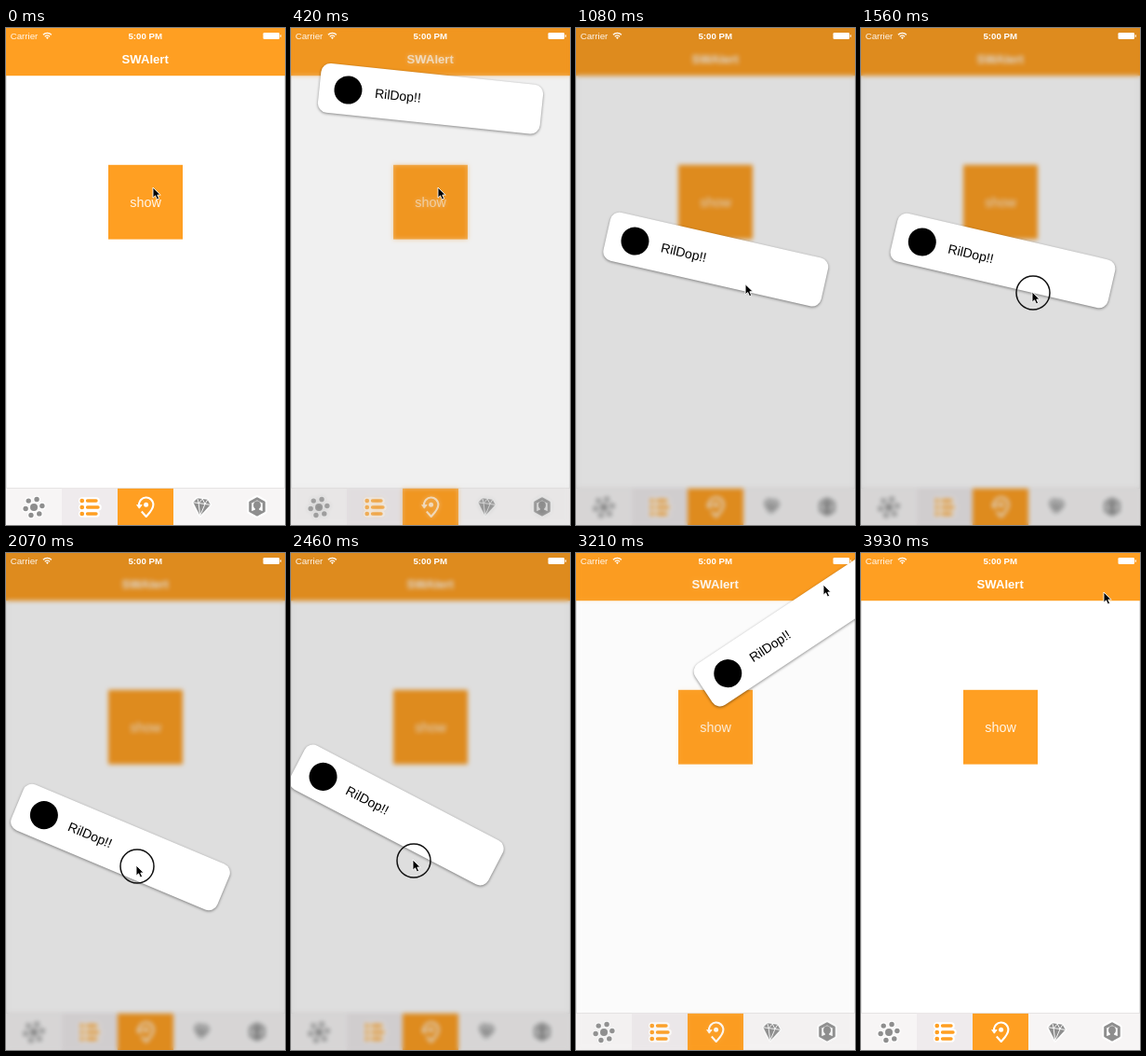
An HTML page that plays this animation: 300x533 px, repeating every 3960 ms.

```html
<!DOCTYPE html>
<html lang="en">
<head>
<meta charset="utf-8">
<title>Alert demo</title>
<style>
  html, body { margin: 0; width: 100%; height: 100%; overflow: hidden; background: #fff; }
  svg { display: block; width: 100vw; height: 100vh; font-family: "Liberation Sans", Arial, sans-serif; }
</style>
</head>
<body>
<svg viewBox="0 0 300 533" preserveAspectRatio="none">
  <defs>
    <filter id="blur" x="0" y="0" width="300" height="533" filterUnits="userSpaceOnUse" color-interpolation-filters="sRGB">
      <feGaussianBlur stdDeviation="2.7"/>
    </filter>
    <filter id="shadow" x="-300" y="-300" width="900" height="1100" filterUnits="userSpaceOnUse" color-interpolation-filters="sRGB">
      <feDropShadow dx="0" dy="1" stdDeviation="1.5" flood-color="#000" flood-opacity=".45"/>
    </filter>
  </defs>

  <g id="app">
    <rect width="300" height="533" fill="#fff"/>
    <path d="M.5 51V494M299.5 51V494" stroke="#000" stroke-opacity=".1"/>
    <rect width="300" height="51.2" fill="#ff9f22"/>
    <text x="149.7" y="38.3" font-size="13.1" font-weight="700" fill="#fff" text-anchor="middle">SWAlert</text>
    <rect x="110" y="146.8" width="80" height="79.8" fill="#ff9f22"/>
    <text x="150" y="191.7" font-size="14.4" fill="#fff" fill-opacity=".9" text-anchor="middle">show</text>

    <rect y="493.6" width="300" height="40" fill="#f7f5f5"/>
    <path d="M0 493.5H300" stroke="#e6e4e4"/>
    <rect x="60" y="493.6" width="60" height="40" fill="#efebed"/>
    <rect x="120" y="493.9" width="60" height="40" fill="#ff9f22"/>

    <g id="dots" fill="#8e8e8e" stroke="#fff" stroke-width="2.4" paint-order="stroke"></g>

    <g fill="none" stroke-linecap="round">
      <path d="M81.7 507H97M81.7 514H99M81.7 521H97" stroke="#fff" stroke-width="7.5"/>
      <path d="M81.7 507h.1M81.7 514h.1M81.7 521h.1" stroke="#ff9f22" stroke-width="4.6"/>
      <path d="M87.5 507H97M87.5 514H99M87.5 521H97" stroke="#ff9f22" stroke-width="3.4"/>
    </g>

    <g fill="none" stroke="#fff" stroke-width="2.1" stroke-linejoin="round">
      <path d="M143 511.5A7.7 7.7 0 0 1 158.4 511C158.4 516.5 153.2 521 150.7 524L145.8 518.5"/>
      <path d="M140.6 511.5H146.2L143.3 515.2Z" fill="#fff" stroke-width=".8"/>
      <circle cx="150.6" cy="511.3" r="2.5" fill="#fff" stroke="none"/>
    </g>

    <g transform="rotate(8 210 514)" stroke-linejoin="round">
      <path d="M204.5 505H215.5L219.3 510L210 523.3L200.7 510Z" fill="#8e8e8e" stroke="#fff" stroke-width="2.8" paint-order="stroke"/>
      <path d="M200.7 510H219.3M204.5 505L206.5 510L210 523L213.5 510L215.5 505M206.5 510L210 505L213.5 510" fill="none" stroke="#fff" stroke-width=".9"/>
    </g>

    <g stroke-linejoin="round">
      <path id="badge" d="M270 504.8L277.3 508.8V518L270 522L262.7 518V508.8Z" fill="#fff" stroke="#fff" stroke-width="7"/>
      <use href="#badge"/>
      <path d="M270 504.8L277.3 508.8V518L270 522L262.7 518V508.8Z" fill="#fff" stroke="#8e8e8e" stroke-width="3"/>
      <ellipse cx="270" cy="511.8" rx="4" ry="4.6" fill="#8e8e8e"/>
      <path d="M268 515H272V516.5L276.5 518.4L270 522L263.5 518.4L268 516.5Z" fill="#8e8e8e"/>
    </g>
  </g>

  <g id="veil">
    <use href="#app" filter="url(#blur)"/>
    <rect width="300" height="533" fill="#000" fill-opacity=".13"/>
  </g>

  <g filter="url(#shadow)">
    <g id="card">
      <rect x="-120" y="-26.5" width="240" height="53" rx="10" fill="#fff"/>
      <circle cx="-89" r="15" fill="#000"/>
      <text x="-60" y="5.3" font-size="14">RilDop!!</text>
    </g>
  </g>

  <g fill="#fff">
    <text x="4.7" y="11.7" font-size="9.7" fill-opacity=".92">Carrier</text>
    <path d="M39.9 7.3A6.4 6.4 0 0 1 48.9 7.3M41.7 9.2A3.9 3.9 0 0 1 47.1 9.2" fill="none" stroke="#fff" stroke-width="1.3"/>
    <path d="M43 10.3A2 2 0 0 1 45.8 10.3L44.4 12Z"/>
    <text x="149.7" y="11.7" font-size="9.7" font-weight="700" text-anchor="middle">5:00 PM</text>
    <rect x="276.5" y="5" width="17.5" height="7" rx="1.3"/>
    <rect x="294.7" y="7.2" width="1.2" height="2.6" rx=".5"/>
  </g>

  <g id="pointer">
    <circle id="ring" cx="1" cy="1" r="18" fill="none" stroke="#111" stroke-width="1.5"/>
    <path d="M0 0V11.2L2.6 8.8L4.5 13L6.6 12.1L4.8 8H8.2Z" fill="#000" stroke="#fff" stroke-width=".9" stroke-linejoin="round"/>
  </g>
</svg>

<script>
const LOOP = 3960, STEP = 30;
const el = id => document.getElementById(id);

const linear = u => u;
const easeIn = u => u * u;
const easeOut = u => 1 - (1 - u) ** 2.5;
const easeInOut = u => u * u * (3 - 2 * u);

// Each stop: time, pose, easing of the way there
const cardStops = [
  { t: 300, pose: [150, -75, 0] },
  { t: 840, pose: [150, 248, 12.7], ease: easeOut },
  { t: 1560, pose: [152.5, 249.5, 13], ease: easeIn },
  { t: 2070, pose: [123, 315.5, 22.7], ease: easeInOut },
  { t: 2460, pose: [113.5, 281, 27.5], ease: easeInOut },
  { t: 3210, pose: [237.5, 80, -33.5], ease: easeIn },
  { t: 3780, pose: [345, -170, -74], ease: linear }
];

const pointerStops = [
  { t: 480, pose: [158, 171] },
  { t: 1200, pose: [184, 283], ease: easeInOut },
  { t: 1560, pose: [184, 283], ease: linear },
  { t: 2070, pose: [140, 335], ease: easeInOut },
  { t: 2460, pose: [131, 329], ease: easeInOut },
  { t: 3120, pose: [266, 34], ease: easeInOut },
  { t: 3210, pose: [266, 34], ease: linear },
  { t: 3540, pose: [261, 42], ease: easeInOut }
];

const ramp = (t, from, to) => Math.min(1, Math.max(0, (t - from) / (to - from)));
const within = (t, from, to) => t >= from && t < to;
const show = (node, on) => node.setAttribute("visibility", on ? "visible" : "hidden");

function poseAt(stops, t) {
  const next = stops.findIndex(s => s.t > t);
  if (next === 0) return stops[0].pose;
  if (next < 0) return stops.at(-1).pose;
  const a = stops[next - 1], b = stops[next];
  const u = b.ease(ramp(t, a.t, b.t));
  return a.pose.map((v, i) => v + (b.pose[i] - v) * u);
}

// One large dot with six small ones around it
function drawDots() {
  const dot = (x, y, r) => `<circle cx="${x}" cy="${y}" r="${r}"/>`;
  let dots = dot(30, 514, 4);
  for (let i = 0; i < 6; i++) {
    const a = (i * 60 - 10) * Math.PI / 180;
    dots += dot(30 + 9 * Math.cos(a), 514 + 9 * Math.sin(a), 2.7);
  }
  el("dots").innerHTML = dots;
}

function draw(t) {
  const [x, y, angle] = poseAt(cardStops, t);
  el("card").setAttribute("transform", `translate(${x} ${y}) rotate(${angle})`);
  show(el("card"), within(t, 300, 3780));

  el("veil").setAttribute("opacity", ramp(t, 300, 570) * (1 - ramp(t, 2940, 3240)));

  const [px, py] = poseAt(pointerStops, t);
  el("pointer").setAttribute("transform", `translate(${px} ${py})`);
  el("pointer").setAttribute("display", within(t, 480, 930) ? "none" : "inline");
  show(el("ring"), within(t, 180, 300) || within(t, 1290, 2940));
}

drawDots();
const start = performance.now();
function tick() {
  const t = (performance.now() - start) % LOOP;
  draw(Math.floor(t / STEP) * STEP);
  requestAnimationFrame(tick);
}
tick();
</script>
</body>
</html>
```
